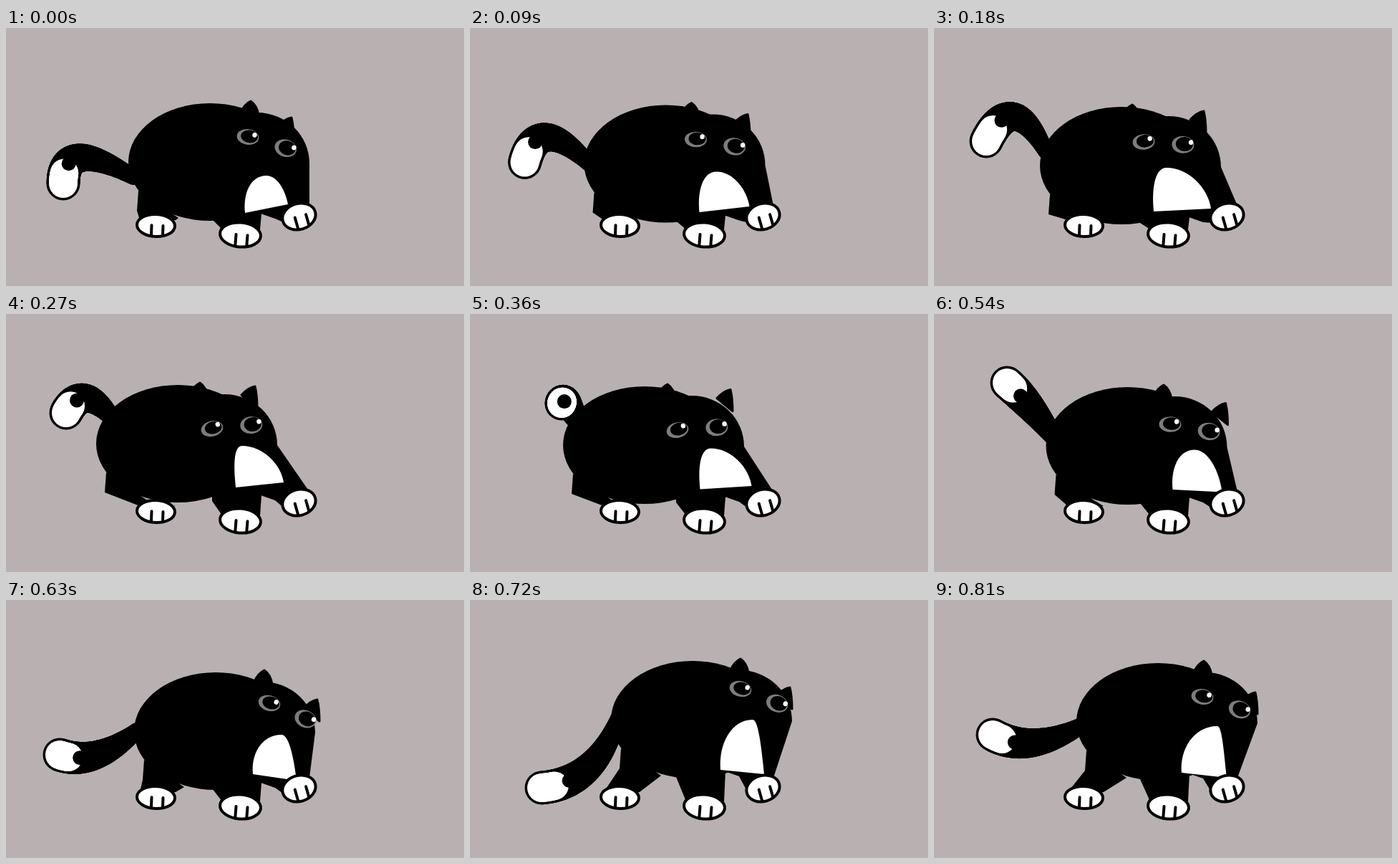
These frames come from a looping animation (640x360 px, 0.9 s). An HTML page with a canvas:

```html
<!DOCTYPE html>
<html lang="en">
<head>
<meta charset="utf-8">
<title>Cat</title>
<style>
html, body { margin: 0; width: 100%; height: 100%; overflow: hidden; background: #b9b1b1; }
canvas { display: block; }
</style>
</head>
<body>
<canvas id="stage" width="640" height="360"></canvas>
<script>
const ctx = document.getElementById('stage').getContext('2d');
const STEP = 90, STEPS = 10;

// Key poses by step; steps without a key are interpolated.
// body centre, left eye, slope of the eye line, left ear x, right ear tip, bib left, top, right
const poses = {
  0: [285,187, 338,152, .29, 342, 399,123, 334,258, 364,206, 394,246],
  2: [262,192, 293,159, .07, 277, 377,114, 307,256, 325,195, 387,252],
  3: [240,181, 288,160, -.09, 271, 348,99, 321,242, 330,184, 388,235],
  5: [248,185, 292,164, -.05, 281, 380,108, 322,247, 343,191, 399,245],
  7: [293,183, 368,144, .41, 361, 435,137, 345,243, 385,188, 406,252],
  8: [311,167, 378,124, .38, 378, 447,120, 350,237, 395,167, 411,243],
  9: [313,170, 375,135, .33, 377, 449,127, 346,241, 396,176, 409,248]
};
// Tail centre line: root, control point, tip.
const tails = {
  0: [178,208, 80,150, 80,217],
  2: [156,172, 110,83, 73,158],
  3: [152,150, 108,92, 84,138],
  5: [165,180, 155,128, 172,112],
  6: [174,181, 135,125, 102,96],
  7: [183,182, 124,233, 75,216],
  8: [207,165, 175,256, 100,262],
  9: [208,174, 134,217, 82,188]
};

function sample(track, step) {
  let a = step, b = step;
  while (!track[a]) a--;
  while (!track[b]) b++;
  const k = (step - a) / (b - a || 1);
  return track[a].map((v, i) => v + (track[b][i] - v) * k);
}

function oval(x, y, rx, ry, color) {
  ctx.fillStyle = color;
  ctx.beginPath();
  ctx.ellipse(x, y, rx, ry, 0, 0, 2 * Math.PI);
  ctx.fill();
}

function shape(color, d) {
  ctx.fillStyle = color;
  ctx.fill(new Path2D(d));
}

// Runs draw() in a frame moved to x, y and turned by tilt.
function placed(x, y, tilt, draw) {
  ctx.save();
  ctx.translate(x, y);
  ctx.rotate(tilt);
  draw();
  ctx.restore();
}

function drawTail([x0, y0, x1, y1, x2, y2]) {
  const dot = (t, r, color) => {
    const u = 1 - t;
    oval(u * u * x0 + 2 * u * t * x1 + t * t * x2,
      u * u * y0 + 2 * u * t * y1 + t * t * y2, r, r, color);
  };
  const radius = t => 11 + 12.5 * Math.sin(t * Math.PI / 2);
  for (let t = 0; t <= 1; t += 1 / 64) dot(t, radius(t), '#000');
  for (let t = .875; t <= 1; t += 1 / 64) dot(t, radius(t) - 3.5, '#fff');
  dot(.72, 10, '#000');
}

function drawEar(x, y, d) {
  placed(x, y, 0, () => {
    const ear = new Path2D(d);
    ctx.fillStyle = '#000';
    ctx.fill(ear);
    ctx.lineWidth = 3;
    ctx.stroke(ear);
  });
}

function drawEye(x, y, tilt, height, glint) {
  placed(x, y, tilt, () => {
    oval(0, 0, 15.5, height, '#7d7d7d');
    oval(2, -1, 12, height - 2, '#000');
    oval(glint, -4, 3.2, 3.4, '#fff');
  });
}

function drawPaw(x, y, rx, ry, tilt) {
  placed(x, y, tilt, () => {
    oval(0, 0, rx, ry, '#fff');
    ctx.lineWidth = 4;
    ctx.stroke(new Path2D(`M-6 0V${ry - 2}M10 0V${ry - 3}`));
    ctx.beginPath();
    ctx.ellipse(0, 0, rx, ry, 0, 0, 2 * Math.PI);
    ctx.stroke();
  });
}

function drawCat(step) {
  const [x, y, eyeX, eyeY, slope, earL, earR, earY, lx, ly, tx, ty, rx, ry] = sample(poses, step);
  ctx.strokeStyle = '#000';
  ctx.lineJoin = ctx.lineCap = 'round';

  drawTail(sample(tails, step));
  oval(x, y, 114, 82, '#000');
  // Hind leg, front leg, then head dome running into the far foreleg.
  shape('#000', `M${x - 100} ${y + 40}L${x - 102} ${y + 68}L187 268H237L${x - 44} ${y + 78}Z`);
  shape('#000', `M288 ${y + 80}L302 281H355L357 ${y + 72}V${y}H288Z`);
  shape('#000', `M${x - 7} ${y + 2}a73 71 0 0 1 146 0L424 248L390 272L376 ${y + 79}L356 ${y + 72}Z`);

  drawEar(earL, y - 85, 'M-14 16Q-9 4 0 0Q9 6 11 20Z');
  drawEar(earR, earY + 2, 'M-19 12Q-10 2 0 0Q3 12 3 30Z');
  shape('#fff', `M${lx} ${ly}C${lx - 3} ${(ly + ty) / 2} ${(lx + tx) / 2 - 8} ${ty} ${tx} ${ty}
    C${tx + (rx - tx) * .5} ${ty} ${rx - 4} ${(ry + ty) / 2} ${rx} ${ry}Z`);

  drawEye(eyeX, eyeY, slope - .15, 10.8, 9);
  drawEye(eyeX + 55 * Math.cos(slope), eyeY + 55 * Math.sin(slope), slope, 12, 11);

  drawPaw(209.5, 275.5, 26.5, 15.5, .04);
  drawPaw(327.5, 288.5, 28.5, 17, .08);
  drawPaw(409.5, 263, 23.5, 18, -.28);
}

const start = performance.now();
function render() {
  const elapsed = Math.max(0, performance.now() - start);
  ctx.fillStyle = '#b9b1b1';
  ctx.fillRect(0, 0, 640, 360);
  drawCat(Math.floor(elapsed / STEP) % STEPS);
  requestAnimationFrame(render);
}
render();
</script>
</body>
</html>
```
